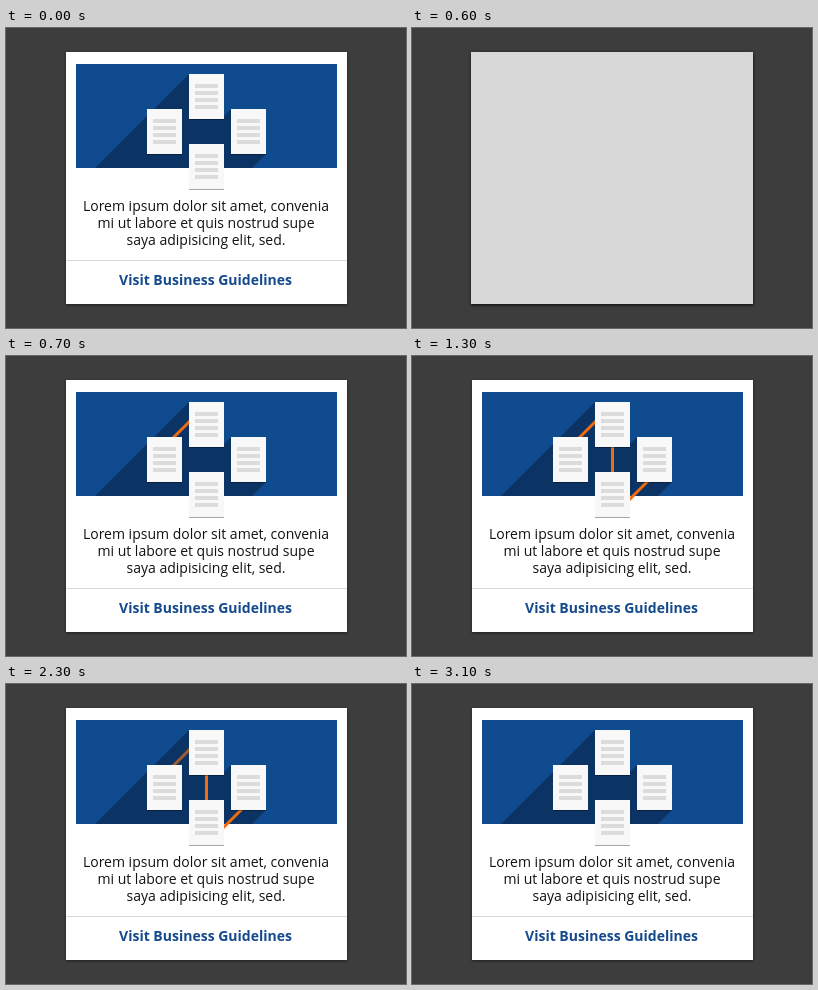
These frames come from a looping animation (400 by 300 pixels, 3.2 s). An HTML page:

```html
<!DOCTYPE html>
<html lang="en">
<head>
<meta charset="utf-8">
<title>Guidelines card</title>
<style>
  html, body { margin: 0; width: 100%; height: 100%; overflow: hidden; background: #3d3d3d; }
  svg { display: block; width: 400px; height: 300px; }
  text { font-family: "Open Sans", "Noto Sans", sans-serif; font-size: 14px; text-anchor: middle; fill: #111; }
  .action { font-weight: 700; fill: #154a8c; }
  .links path { fill: none; stroke: #f26c0d; stroke-width: 3; }
  .card { filter: drop-shadow(0 1px 1.5px rgba(0, 0, 0, .5)); }
</style>
</head>
<body>
<svg viewBox="0 0 400 300">
  <defs>
    <g id="paper">
      <rect y="1" width="35" height="45" fill="#000" opacity=".35"/>
      <rect width="35" height="45" fill="#f8f8f8"/>
      <path d="M6 12h23M6 19h23M6 26h23M6 33h23" stroke="#dcdcdc" stroke-width="4"/>
    </g>
  </defs>
  <rect class="card" x="60" y="24" width="281" height="252" fill="#fff"/>
  <rect x="70" y="36" width="261" height="104" fill="#114b8f"/>
  <path d="M183 46L89 140H246L260 126V81H225L218 88V46Z" fill="#0b3363"/>
  <g class="links">
    <path d="M187 62L162 87"/>
    <path d="M200.5 88V120"/>
    <path d="M241 120L214 147"/>
  </g>
  <use href="#paper" x="183" y="46"/>
  <use href="#paper" x="141" y="81"/>
  <use href="#paper" x="225" y="81"/>
  <use href="#paper" x="183" y="116"/>
  <text x="200" y="183">Lorem ipsum dolor sit amet, convenia</text>
  <text x="200" y="200">mi ut labore et quis nostrud supe</text>
  <text x="200" y="217">saya adipisicing elit, sed.</text>
  <rect x="60" y="232" width="281" height="1" fill="#d8d8d8"/>
  <text class="action" x="199.5" y="257">Visit Business Guidelines</text>
  <rect id="blank" class="card" x="59" y="24" width="282" height="252" fill="#d8d8d8" visibility="hidden"/>
</svg>
<script>
  const LOOP = 3200, STEP = 100, FADE = 3;
  const SHOW = 500, HIDE = 2300, BLANK = 600;
  const links = document.querySelectorAll('.links path');
  const blank = document.getElementById('blank');

  // Fraction of a stepped fade completed at time t
  const fade = (t, start) =>
    Math.max(0, Math.min(FADE, Math.floor((t - start) / STEP) + 1)) / FADE;

  function draw(now) {
    const t = now % LOOP;
    links.forEach((link, i) => {
      const delay = i * FADE * STEP;
      link.style.opacity = fade(t, SHOW + delay) - fade(t, HIDE + delay);
    });
    const covered = t >= BLANK && t < BLANK + STEP;
    blank.setAttribute('visibility', covered ? 'visible' : 'hidden');
    requestAnimationFrame(draw);
  }
  draw(0);
</script>
</body>
</html>
```
